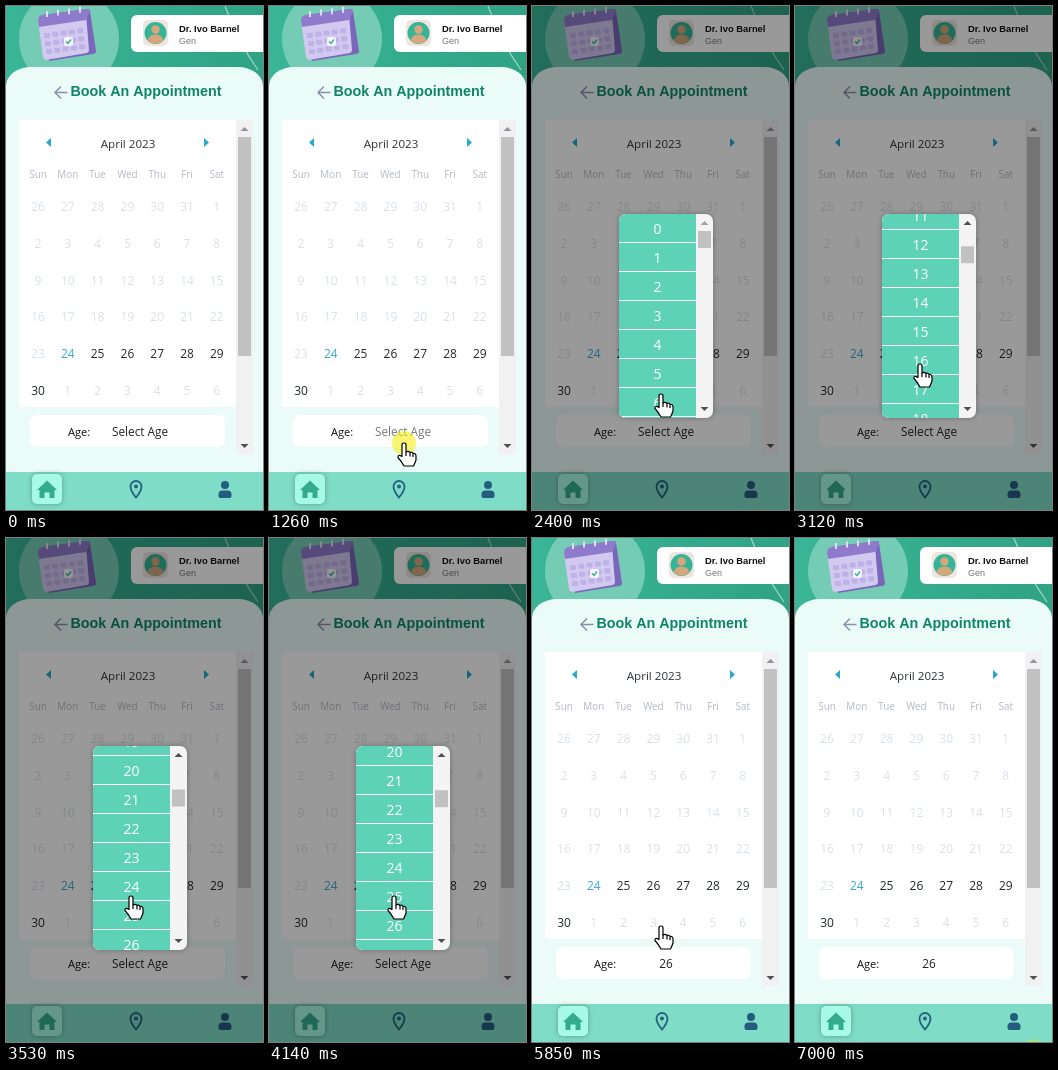
Write an HTML page with a canvas that moves like this. It is 257 px wide and 504 px high and loops after 7.2 s.

```html
<!DOCTYPE html>
<html lang="en">
<head>
<meta charset="utf-8">
<title>Appointment booking</title>
<style>
  html, body { margin: 0; width: 257px; height: 504px; overflow: hidden; }
  canvas { display: block; }
</style>
</head>
<body>
<canvas width="257" height="504"></canvas>
<script>
const ctx = document.querySelector('canvas').getContext('2d');
const LOOP = 7200;
const UI = '"Open Sans", sans-serif';
const ARIAL = '"Liberation Sans", sans-serif';
const ROW = 29, ITEMS = 121;
const POPUP = { x: 87, y: 208, w: 94, h: 204, listW: 77 };
const HAND = new Path2D('M-2 1Q-2-1 0-1Q2-1 2 1V8Q4 6.5 6 8.5Q8 7.5 9 9.5Q12 9 12 12V16Q11 19 9.5 22H0Q-2 18-6 13.5Q-6.5 10-2 12.5Z');
const KNUCKLES = new Path2D('M2 8V12M6 9V12.5M9 10V13');
const CALENDAR_ROWS = [26, 2, 9, 16, 23, 30];

// Keys: [time, ...values]
const CURSOR = [
  [0, 239, 513], [380, 239, 513], [450, 198, 485], [600, 160, 455], [860, 135, 437],
  [2399, 135, 437], [2400, 129, 388], [2469, 129, 388], [2470, 125, 358],
  [4470, 125, 358], [4950, 126, 417], [5220, 127, 407], [5430, 129, 388],
  [6050, 129, 388], [6250, 160, 422], [6530, 239, 513], [LOOP, 239, 513]
];
const SCROLL = [
  [0, 0], [2730, 0], [2900, 140], [3200, 400], [3530, 570],
  [3930, 588], [4139, 588], [4140, 589], [LOOP, 589]
];

function track(keys, t) {
  const i = keys.findIndex(key => key[0] > t);
  const a = keys[i - 1], b = keys[i];
  const u = (t - a[0]) / (b[0] - a[0]);
  return a.slice(1).map((v, j) => v + (b[j + 1] - v) * u);
}

function box(x, y, w, h, color, radius = 0) {
  ctx.fillStyle = color;
  ctx.beginPath();
  ctx.roundRect(x, y, w, h, radius);
  ctx.fill();
}

function shadowBox(...args) {
  ctx.shadowColor = 'rgba(0,0,0,.3)';
  ctx.shadowBlur = 5;
  box(...args);
  ctx.shadowColor = 'transparent';
}

function disc(x, y, r, color) {
  ctx.fillStyle = color;
  ctx.beginPath();
  ctx.arc(x, y, r, 0, Math.PI * 2);
  ctx.fill();
}

function shape(d, color) {
  ctx.fillStyle = color;
  ctx.fill(new Path2D(d));
}

function line(d, color, width) {
  ctx.strokeStyle = color;
  ctx.lineWidth = width;
  ctx.stroke(new Path2D(d));
}

// y is the middle of the capitals
function text(str, x, y, size, color, align = 'center', family = UI, weight = 400) {
  ctx.font = `${weight} ${size}px ${family}`;
  ctx.textAlign = align;
  ctx.fillStyle = color;
  ctx.fillText(str, x, y + size * 0.36);
}

function drawCalendarArt() {
  shape('M37 9L82 3Q84 3 84 5L90 45Q90 48 87 48L43 55Z', '#7a66bb');
  shape('M32 15Q32 13 34 12L77 6Q80 6 80 8L83 44Q83 46 81 47L40 54Q38 54 37 51Z', '#d2c9f1');
  shape('M32 15Q32 10 36 9L82 3Q84 3 84 5L80 14L33 21Z', '#8f7bcb');
  for (let i = 0; i < 4; i++) line(`M${41 + i * 11} ${11 - i * 1.4}v-6`, '#e3dbf8', 2);
  for (let r = 0; r < 3; r++) {
    for (let c = 0; c < 5; c++) {
      box(38 + c * 8.3 + r, 27 - c * 1.2 + r * 8, 6, 5, '#bdb1e5', 1);
    }
  }
  box(58, 31, 9, 9, '#f5f3ff', 2);
  line('M60 35.5l2 2l3-4', '#39b08d', 1.4);
}

function drawHeader() {
  const green = ctx.createLinearGradient(0, 0, 257, 0);
  green.addColorStop(0, '#3ab598');
  green.addColorStop(1, '#2fa384');
  box(0, 0, 257, 90, green);
  disc(63, 33, 50, '#74ccb5');
  line('M219 0Q232 36 252 64', 'rgba(255,255,255,.55)', 1.2);
  drawCalendarArt();

  box(125, 9, 140, 37, '#fff', 6);
  box(137, 14, 25, 26, '#efe5df', 5);
  disc(149.5, 27, 11, '#35b497');
  shape('M141.5 34.5Q143 28.5 149.5 28.5Q156 28.5 157.5 34.5Q149.5 41 141.5 34.5Z', '#d8a67c');
  disc(149.5, 23.5, 4.2, '#d8a67c');
  text('Dr. Ivo Barnel', 173, 22.5, 9.4, '#111', 'left', ARIAL, 700);
  text('Gen', 173, 34.5, 9, '#777', 'left', ARIAL);
}

function drawCalendar() {
  box(13, 114, 217, 287, '#fff');
  shape('M45 132v9l-5-4.5z', '#27a9c9');
  shape('M198 132v9l5-4.5z', '#27a9c9');
  text('April 2023', 122, 137.5, 11.6, '#2d3338');
  'Sun Mon Tue Wed Thu Fri Sat'.split(' ').forEach((day, c) =>
    text(day, 32 + c * 29.8, 168.5, 9.9, '#b3b9c2'));

  CALENDAR_ROWS.forEach((first, r) => {
    for (let c = 0; c < 7; c++) {
      const limit = r === 0 ? 31 : 30;
      const day = (first + c - 1) % limit + 1;
      const index = r * 7 + c;
      const color = index === 29 ? '#3aa9cd' : index > 29 && index < 36 ? '#22282d' : '#d9e1e8';
      text(day, 32 + c * 29.8, 201 + r * 36.7, 12, color);
    }
  });

  box(230, 114, 17, 334, '#f1f1f1');
  box(232, 131, 13, 219, '#c1c1c1');
  shape('M234.5 125h8l-4-4z', '#9292a0');
  shape('M234.5 438h8l-4 4z', '#505050');
}

function drawNav() {
  box(0, 466, 257, 38, '#7fdcc6');
  shadowBox(26, 468, 30, 30, '#a6fae6', 5);
  shape('M41 474.5L51 484H48.5V492H43.5V486.5H38.5V492H33.5V484H31Z', '#35ab8d');
  line('M130 491.5Q124.5 485 124.5 480.5A5.5 5.5 0 0 1 135.5 480.5Q135.5 485 130 491.5Z', '#23627f', 1.8);
  disc(130, 480.5, 2, '#23627f');
  disc(219, 479, 4, '#245c80');
  box(212.5, 484.5, 13, 7.5, '#245c80', [4, 4, 2, 2]);
}

function drawPage(t) {
  drawHeader();
  const corner = { x: 25, y: 19 };
  box(0, 61, 257, 410, '#ebfbf7', [corner, corner, 0, 0]);
  line('M61.5 86.5H49M55 80.5L49 86.5L55 92.5', '#8a91a8', 1.5);
  text('Book An Appointment', 64.5, 85, 14.3, '#0e8568', 'left', ARIAL, 700);
  drawCalendar();

  box(24, 409, 195, 32, '#fff', 7);
  text('Age:', 62, 426, 11.1, '#111', 'left');
  const pressed = t >= 1130 && t < 1400;
  text(t < 5850 ? 'Select Age' : '26', 134, 426, 11.8, pressed ? '#777' : '#222');
  drawNav();
}

function drawPopup(t) {
  const { x, y, w, h, listW } = POPUP;
  const [scroll] = track(SCROLL, t);
  ctx.save();
  shadowBox(x, y, w, h, '#f4f4f4', 7);
  ctx.clip();
  for (let i = Math.floor(scroll / ROW); i * ROW < scroll + h; i++) {
    const top = y + i * ROW - Math.round(scroll);
    const pressed = i === 26 && t >= 5630;
    box(x, top, listW, ROW, '#fff');
    box(x, top, listW, ROW - 1, pressed ? '#80d9c4' : '#5dd2b7');
    text(i, x + 38.5, top + 15, 14, '#fff');
  }
  const thumb = y + 17 + 153 * scroll / (ITEMS * ROW - h);
  box(166, thumb, 13, 17, '#c1c1c1');
  shape('M168.5 219h8l-4-4z', scroll ? '#505050' : '#a3a3a3');
  shape('M168.5 401h8l-4 4z', '#505050');
  ctx.restore();
}

function drawCursor(t) {
  const [x, y] = track(CURSOR, t);
  const clicks = [[1130, 1400], [5630, 5850], [7000, LOOP]];
  const click = clicks.find(([start, end]) => t >= start && t < end);
  if (click) {
    const alpha = Math.min(0.58, 0.3 + (t - click[0]) / 250);
    disc(x, y, 12, `rgba(241,238,12,${alpha})`);
  }
  ctx.save();
  ctx.translate(x, y + 1);
  ctx.fillStyle = '#fff';
  ctx.strokeStyle = '#000';
  ctx.lineWidth = 1.2;
  ctx.lineJoin = 'round';
  ctx.fill(HAND);
  ctx.stroke(HAND);
  ctx.stroke(KNUCKLES);
  ctx.restore();
}

function frame(now) {
  const t = now % LOOP;
  drawPage(t);
  if (t >= 1400 && t < 5850) {
    ctx.globalAlpha = Math.min(1, (t - 1340) / 330);
    box(0, 0, 257, 504, 'rgba(0,0,0,.4)');
    drawPopup(t);
    ctx.globalAlpha = 1;
  }
  drawCursor(t);
  requestAnimationFrame(frame);
}
requestAnimationFrame(frame);
</script>
</body>
</html>
```
